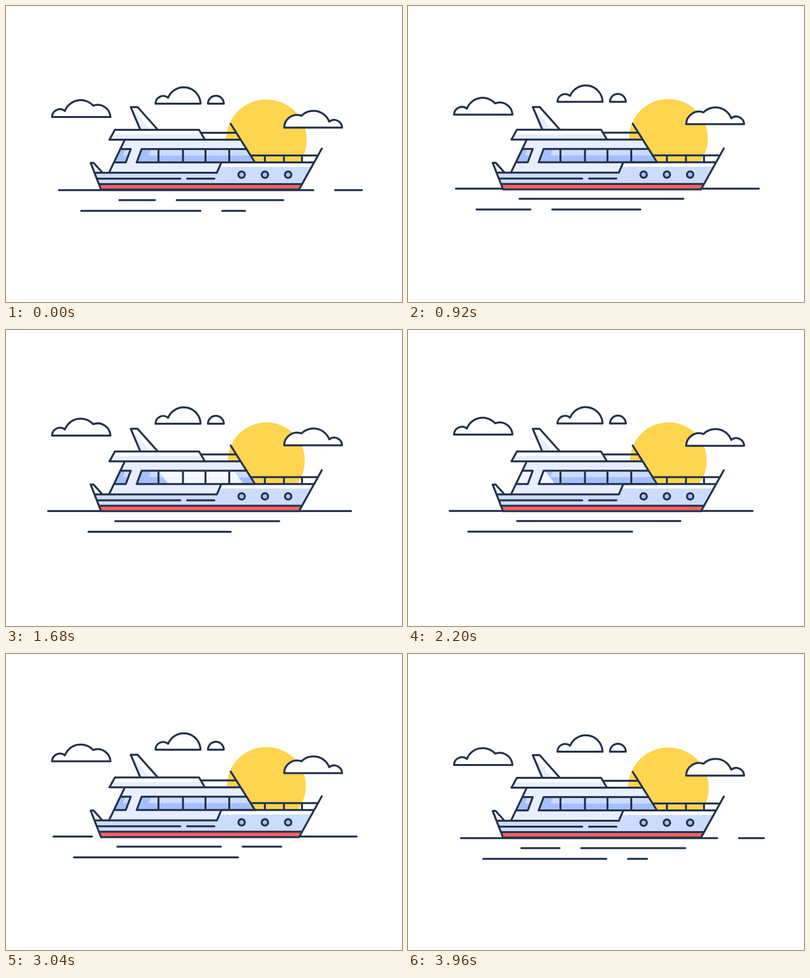
An HTML page that plays this animation: 800 px wide and 600 px high, repeating every 4 s.

```html
<!DOCTYPE html>
<html lang="en">
<head>
<meta charset="utf-8">
<title>Yacht at sea</title>
<style>
  html, body { margin: 0; width: 100%; height: 100%; overflow: hidden; background: #fff; }
  svg { display: block; width: 100vw; height: 100vh; }
  .ink { fill: none; stroke: #25344b; stroke-width: 4; stroke-linecap: round; stroke-linejoin: round; }
  .cloud { fill: #fff; }
  .white { fill: #fff; }
  .pale { fill: #e6eeff; }
  .hull { fill: #ccdcff; }
  .glass { fill: #a4bfff; }
  .red { fill: #ff6063; }
</style>
</head>
<body>
<svg viewBox="0 0 800 600">
  <defs>
    <clipPath id="windows">
      <path d="M274 290H486L503 317H264ZM231 290H252L242 317H219Z"/>
    </clipPath>
  </defs>

  <circle id="sun" cx="526" fill="#ffd44f"/>

  <g class="ink">
    <path id="cloudLeft" class="cloud" d="M93 225A16 16 0 0 1 119 212.8A34 34 0 0 1 176 202A26 26 0 0 1 211 225Z"/>
    <path id="cloudMiddle" class="cloud" d="M302 198A15.5 15.5 0 0 1 327.5 186A34 34 0 0 1 393 198ZM408 198A16 16 0 0 1 440 198Z"/>
    <path id="cloudRight" class="cloud" d="M562 246.5A26 26 0 0 1 597 222.5A34 34 0 0 1 653 234.5A16 16 0 0 1 679 246.5Z"/>
    <path id="wave0"/>
    <path id="wave1"/>
    <path id="wave2"/>
  </g>

  <g id="boat">
    <!-- hull -->
    <path class="hull" d="M179 338H426L435 317H622L592 372H192Z"/>
    <path class="white" d="M435 317H622L617 326H431Z"/>
    <path class="red" d="M188 361H598L592 372H192Z"/>
    <path class="pale" d="M171 318H177L195 338H179Z"/>
    <path class="white" d="M174 318H177L195 338H190Z"/>
    <!-- cabin, roof and mast -->
    <path class="pale" d="M240 271H473L503 317H435L426 338H208Z"/>
    <path class="pale" d="M220 251H390L402 271H209Z"/>
    <path class="white" d="M220 251H390L395.5 260H215Z"/>
    <path class="white" d="M252 205H266L306 250H271Z"/>
    <path class="pale" d="M252 205L291 250H271Z"/>
    <!-- glass -->
    <g clip-path="url(#windows)">
      <path class="glass" d="M210 290H510V317H210Z"/>
      <path class="hull" d="M293 290H510V303H288ZM241 290H252L247 303H236Z"/>
      <path id="shine" fill="#fff" fill-opacity=".85" d="M0 290H152L172 317H20Z"/>
    </g>
    <g class="ink">
      <path d="M192 372L171 318H177L195 338M192 372H592L638 289M188 361H598M181 338H426L435 317H622"/>
      <path d="M185 350H352M366 350H421"/>
      <path d="M208 338L240 271M209 271L220 251H390L402 271ZM402 271H473M394 257H463M454 239L503 317"/>
      <path d="M271 250L252 205H266L306 250"/>
      <path d="M231 290H252L242 317H219M486 290H274L264 317H503M308 290V317M357.5 290V317M403 290V317M451 290V317"/>
      <path d="M495 303H628M523 303V317M561.5 303V317M598 303V317"/>
      <g class="glass">
        <circle cx="476" cy="342" r="6.5"/>
        <circle cx="523" cy="342" r="6.5"/>
        <circle cx="570" cy="342" r="6.5"/>
      </g>
    </g>
  </g>
</svg>

<script>
const LOOP = 4000;
const GAP = 44;
const DASH_TRAVEL = 574;
const el = id => document.getElementById(id);

// Each wave line drifts left and back while its gap runs steadily along it.
const waves = [
  { x: 107, y: 373.2, length: 612, drift: 23.4, gapStart: 514, period: 572 },
  { x: 229, y: 393.6, length: 331, drift: 8.7, gapStart: 72, period: 573.5 },
  { x: 152, y: 415.3, length: 331, drift: 31, gapStart: 241, period: 576 }
];
waves.forEach((wave, i) => {
  wave.node = el("wave" + i);
  wave.node.setAttribute("d", `M${wave.x} ${wave.y}h${wave.length}`);
  wave.node.setAttribute("stroke-dasharray", `${wave.period - GAP} ${GAP}`);
});

const move = (node, x, y) => node.setAttribute("transform", `translate(${x} ${y})`);

// Sine-eased 0 -> 1 -> 0 with its turning point at the given time.
function swing(t, turn = LOOP / 2) {
  const k = t < turn ? t / turn : (LOOP - t) / (LOOP - turn);
  return (1 - Math.cos(Math.PI * k)) / 2;
}

function boatBob(t) {
  const a = 2 * Math.PI * t / LOOP;
  return -1.67 + 3.09 * Math.cos(a) - 0.69 * Math.cos(2 * a) - 0.73 * Math.cos(3 * a);
}

function draw(t) {
  const tide = swing(t);

  el("sun").setAttribute("cy", 271 - 6.4 * tide);
  el("sun").setAttribute("r", 81.5 - 4.1 * tide);

  move(el("cloudLeft"), 0, -13 * swing(t, 2240));
  move(el("cloudMiddle"), 0, -8.6 * tide);
  move(el("cloudRight"), 0, -12.9 * swing(t, 1760));

  for (const { node, drift, gapStart, period } of waves) {
    move(node, -drift * tide, -6.6 * tide);
    node.setAttribute("stroke-dashoffset", period - GAP - gapStart + DASH_TRAVEL * t / LOOP);
  }

  move(el("boat"), 0, boatBob(t));
  move(el("shine"), 463 - 0.352 * (t - 1240), 0);
}

const start = performance.now();
function frame() {
  draw((performance.now() - start) % LOOP);
  requestAnimationFrame(frame);
}
frame();
</script>
</body>
</html>
```
